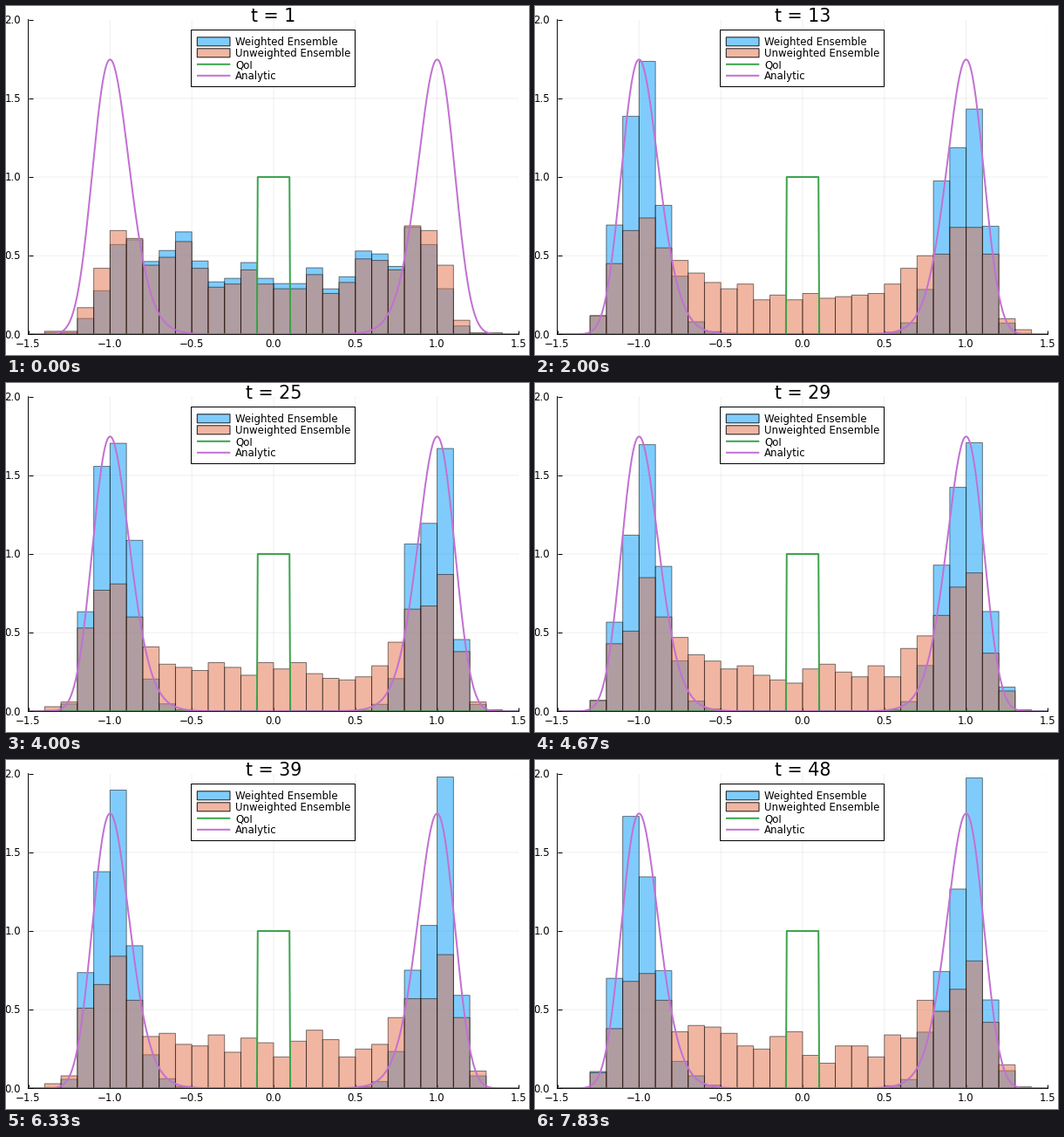
These frames come from a looping animation (600x400 px, 8 s). A matplotlib script:

```python
import numpy as np
import matplotlib.pyplot as plt
from matplotlib.animation import FuncAnimation
from matplotlib.patches import Rectangle

W, H, DPI = 600, 400, 100
PX = 72 / DPI                       # points per pixel
STEPS, STEP_MS = 48, 166.5
LEFT, RIGHT, TOP, BOTTOM = 25.6, 588.4, 15.6, 376.4

BLUE, ORANGE = (0.0, 0.604, 0.98), (0.888, 0.435, 0.278)
GREEN, PURPLE = "#3da44d", "#c271d2"

WALKERS = 1000
EDGES = np.arange(-14, 14) / 10
MID = EDGES + 0.05

# Mean walker density against |x|, at the start and once settled
RADIUS = [.05, .45, .65, .75, .85, .95, 1.05, 1.15, 1.25, 1.35]
START = [.31, .33, .49, .54, .69, .67, .47, .10, .025, .005]
SETTLED = [.25, .28, .35, .43, .575, .77, .75, .44, .085, .01]


def double_well(x):
    """Density of the stationary law for the potential (x^2 - 1)^2."""
    grid = np.linspace(-2, 2, 4001)
    norm = np.exp(-10 * (grid ** 2 - 1) ** 2).sum() * 0.001
    return np.exp(-10 * (x ** 2 - 1) ** 2) / norm


def simulate():
    """Weighted and unweighted bar heights for every step."""
    rng = np.random.default_rng(4)
    start = np.interp(abs(MID), RADIUS, START)
    settled = np.interp(abs(MID), RADIUS, SETTLED)
    start_w = start * np.maximum(1.12 - 0.34 * MID ** 6, 0.6)
    settled_w = double_well(MID)
    out = []
    for step in range(STEPS):
        young = np.exp(-step / 2.7)
        mean = settled + (start - settled) * young
        mean_w = settled_w + (start_w - settled_w) * young
        plain = rng.multinomial(WALKERS, mean / mean.sum()) * 10 / WALKERS
        jitter = np.exp(0.12 * (1 - young) * rng.standard_normal(len(MID)))
        weighted = plain * mean_w / mean * jitter
        out.append((weighted * 10 / weighted.sum(), plain))
    return out


plt.rcParams["font.family"] = "DejaVu Sans"
plt.rcParams["path.snap"] = False
fig = plt.figure(figsize=(W / DPI, H / DPI), dpi=DPI, facecolor="white")

ax = fig.add_axes([LEFT / W, 1 - BOTTOM / H, (RIGHT - LEFT) / W, (BOTTOM - TOP) / H])
ax.set(xlim=(-1.5, 1.5), ylim=(0, 2))
ax.set_xticks(np.arange(-3, 4) / 2, [])
ax.set_yticks(np.arange(5) / 2, [])
ax.tick_params(direction="in", length=4.5 * PX, width=PX)
ax.set_axisbelow(True)
ax.grid(color="black", alpha=0.06, lw=PX)
for side in ("top", "right"):
    ax.spines[side].set_visible(False)
for side in ("left", "bottom"):
    ax.spines[side].set_linewidth(PX)


def bars(color):
    group = ax.bar(EDGES, np.zeros(len(EDGES)), 0.1, align="edge", lw=PX,
                   facecolor=color + (0.5,), edgecolor=(0, 0, 0, 0.5), zorder=1.5)
    for bar in group:
        bar.set_snap(False)
    return group


blue_bars, orange_bars = bars(BLUE), bars(ORANGE)

x = np.linspace(-1.5, 1.5, 601)
ax.plot([-1.5, -0.102, -0.097, 0.097, 0.102, 1.5], [0, 0, 1, 1, 0, 0],
        color=GREEN, lw=2 * PX)
ax.plot(x, double_well(x), color=PURPLE, lw=2 * PX)

# Overlay in pixel coordinates for text and legend
top = fig.add_axes([0, 0, 1, 1], facecolor="none")
top.set(xlim=(0, W), ylim=(H, 0))
top.axis("off")


def label(x, y, text, size=11.7, ha="center"):
    return top.text(x, y, text, fontsize=size * PX, ha=ha, va="baseline")


for v in np.arange(-3, 4) / 2:
    label(306.7 + v * (RIGHT - LEFT) / 3, 391.2, f"{v:.1f}".replace("-", "\u2212"))
for v in np.arange(5) / 2:
    label(17.2, BOTTOM - v * (BOTTOM - TOP) / 2 + 4.3, f"{v:.1f}", ha="right")
title = label(307, 18.2, "t = 1", 20.7)

top.add_patch(Rectangle((212.5, 27.5), 188, 65, fc="white", ec="black", lw=PX))
entries = [("Weighted Ensemble", BLUE), ("Unweighted Ensemble", ORANGE),
           ("QoI", GREEN), ("Analytic", PURPLE)]
for i, (name, color) in enumerate(entries):
    y = 40.8 + 13 * i
    if i < 2:
        top.add_patch(Rectangle((219.3, y - 5), 37.7, 10, fc=color + (0.5,),
                                ec=(0, 0, 0, 0.9), lw=PX))
    else:
        top.plot([219, 257.3], [y, y], color=color, lw=2 * PX,
                 solid_capstyle="butt")
    label(263, y + 4.4, name, ha="left")

heights = simulate()


def draw(i):
    for group, values in zip((blue_bars, orange_bars), heights[i]):
        for bar, h in zip(group, values):
            bar.set_height(h)
            bar.set_visible(h > 0.003)
    title.set_text(f"t = {i + 1}")
    return [*blue_bars, *orange_bars, title]


anim = FuncAnimation(fig, draw, frames=STEPS, interval=STEP_MS,
                     init_func=lambda: draw(0), repeat=True, repeat_delay=0)
plt.show()
```
